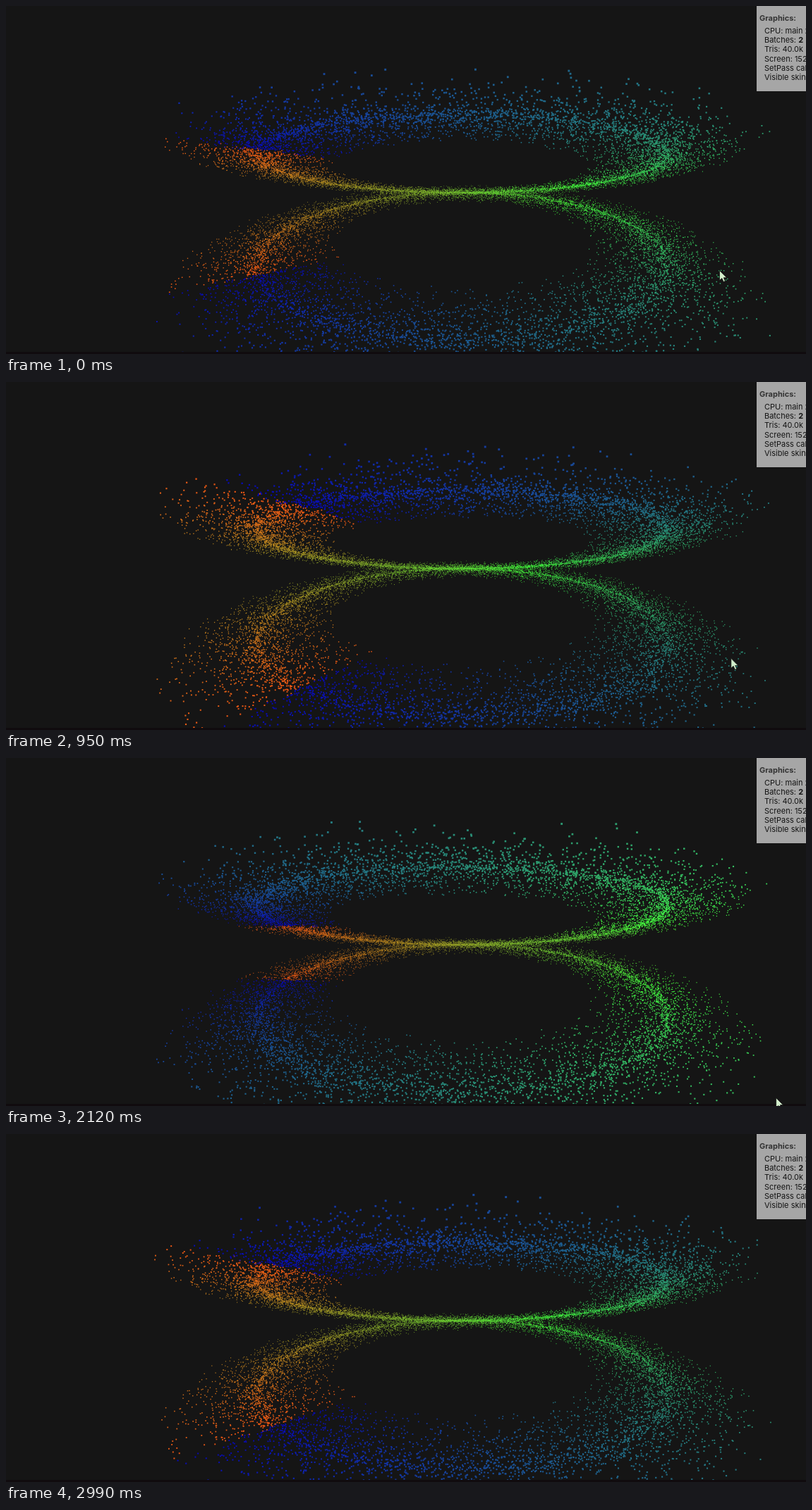
Animation, 1134 px wide and 494 px high, one loop 3.06 s. Source, as an HTML page with a canvas:

```html
<!DOCTYPE html>
<html lang="en">
<head>
<meta charset="utf-8">
<title>Particle rings</title>
<style>
  html, body { margin: 0; width: 100%; height: 100%; overflow: hidden; background: #151515; }
  canvas, svg { position: absolute; left: 0; top: 0; width: 1134px; height: 494px; display: block; }
  text { font: 11px Inter, "Liberation Sans", sans-serif; fill: #141414; }
  .bold { font-weight: 700; }
  .head { fill: #333; }
</style>
</head>
<body>
<canvas id="dots" width="1134" height="494"></canvas>
<svg viewBox="0 0 1134 494">
  <rect y="491" width="1134" height="3" fill="#100b0e"/>
  <rect x="1064" width="70" height="121" fill="#a6a6a6"/>
  <text class="bold head" x="1068" y="21">Graphics:</text>
  <g id="rows">
    <text>CPU: main 2.4ms</text>
    <text>Batches: <tspan class="bold">2</tspan></text>
    <text>Tris: 40.0k</text>
    <text>Screen: 1520x720</text>
    <text>SetPass calls: 2</text>
    <text>Visible skinned meshes: 0</text>
  </g>
  <path id="cursor" d="M0 0V14L3.3 11L5.6 16L8 15L5.8 10.2H10Z" fill="#d2eecb" stroke="#151515" stroke-width=".8"/>
</svg>
<script>
const LOOP = 3060, STEPS = 39, STEP = LOOP / STEPS;
const COUNT = 20000, SHADES = 180;
const CENTER_X = 647, DEPTH = 3.03, FOCAL = 529, DOT = 3.3;
const START_ANGLE = -34, DEGREES_PER_MS = 0.3575;

// Each ring is a tilted plane: screen y = horizon + slope / depth.
const RINGS = [
  { horizon: 324.4, slope: -266.8 },
  { horizon: 152, slope: 507.6 }
];

// [ms, x, y]
const POINTER = [
  [0, 1011.5, 375.5], [400, 1015.5, 377.5], [950, 1028, 392.5],
  [1410, 1053.5, 436.5], [1810, 1065.5, 462.5], [2360, 1112, 498]
];

const ctx = document.getElementById("dots").getContext("2d");
const cursor = document.getElementById("cursor");

[...document.getElementById("rows").children].forEach((row, i) => {
  row.setAttribute("x", 1075);
  row.setAttribute("y", 38.8 + 13.3 * i);
});

let seed = 20011;
function random() {
  seed = (seed + 0x6D2B79F5) | 0;
  let n = Math.imul(seed ^ (seed >>> 15), 1 | seed);
  n = (n + Math.imul(n ^ (n >>> 7), 61 | n)) ^ n;
  return ((n ^ (n >>> 14)) >>> 0) / 4294967296;
}

function track(keys, t) {
  let i = 1;
  while (i < keys.length - 1 && keys[i][0] < t) i++;
  const a = keys[i - 1], b = keys[i];
  const k = Math.min(1, (t - a[0]) / (b[0] - a[0]));
  return a.slice(1).map((v, j) => v + (b[j + 1] - v) * k);
}

// Orange to green to blue around one turn.
function shade(turn) {
  const end = turn < 0.5 ? [235, 85, 20] : [8, 8, 185];
  const w = Math.pow(1 - Math.abs(2 * turn - 1), 0.95);
  const mix = [70, 255, 64].map((g, i) => Math.round(end[i] + (g - end[i]) * w));
  return `rgb(${mix})`;
}

const palette = Array.from({ length: SHADES }, (_, i) => shade((i + 0.5) / SHADES));

// Dots scatter around the ring's core: random direction, random distance.
const dots = Array.from({ length: COUNT }, (_, i) => {
  const distance = random(), c = random() * 2 - 1;
  const height = Math.sqrt(1 - c * c) * Math.cos(2 * Math.PI * random());
  return {
    turn: (i + random()) / COUNT,
    radius: 1.46 + 0.49 * distance * c,
    lift: 9 * distance * height,
    ring: RINGS[i % 2]
  };
});

function drawDots(t) {
  ctx.fillStyle = "#151515";
  ctx.fillRect(0, 0, 1134, 494);
  const start = (START_ANGLE + DEGREES_PER_MS * t) / 360;
  let last = -1;
  for (const { turn, radius, lift, ring } of dots) {
    const angle = (start + turn) * 2 * Math.PI;
    const z = DEPTH + radius * Math.sin(angle);
    const x = CENTER_X - FOCAL * radius * Math.cos(angle) / z;
    const y = ring.horizon + (ring.slope + lift) / z;
    const size = DOT / z;
    const tone = Math.floor(turn * SHADES);
    if (tone !== last) ctx.fillStyle = palette[last = tone];
    ctx.fillRect(x - size / 2, y - size / 2, size, size);
  }
}

let shown = -1;
function render(now) {
  const step = Math.min(STEPS - 1, Math.floor((now % LOOP + 5) / STEP));
  if (step === shown) return;
  shown = step;
  const t = step * STEP;
  drawDots(t);
  cursor.setAttribute("transform", `translate(${track(POINTER, t)})`);
}

let origin = null;
function tick(now) {
  if (origin === null) origin = now;
  render(Math.max(0, now - origin));
  requestAnimationFrame(tick);
}

render(0);
requestAnimationFrame(tick);
</script>
</body>
</html>
```
